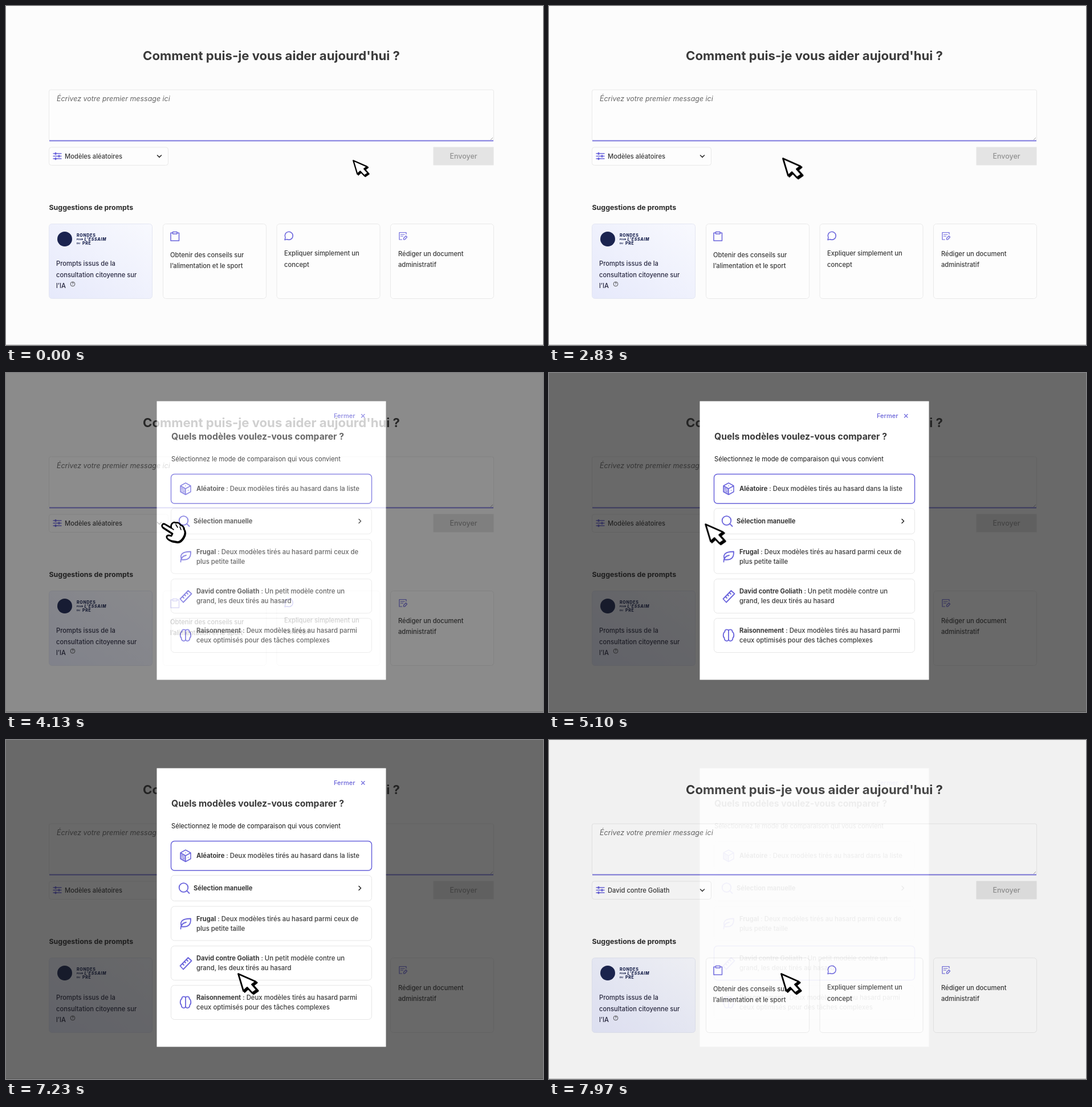
Write an HTML page that moves like this. It is 942x595 px and loops after 8 s.

```html
<!DOCTYPE html>
<html lang="fr">
<head>
<meta charset="utf-8">
<title>Choix du modèle</title>
<style>
  html, body { margin: 0; width: 100%; height: 100%; overflow: hidden; background: #fcfcfc; }
  svg { display: block; width: 942px; height: 595px; }
  text { font: 500 11.2px Inter, "Open Sans", sans-serif; fill: #3a3a3a; }
  .h1 { font-size: 22.15px; font-weight: 700; text-anchor: middle; }
  .h2 { font-size: 12.4px; font-weight: 650; fill: #2c2c2c; }
  .h3 { font-size: 15.7px; font-weight: 700; }
  .hint { font-size: 12.45px; font-weight: 400; font-style: italic; fill: #666; }
  .send { font-size: 12.5px; fill: #929292; text-anchor: middle; }
  .opt { font-size: 11.35px; font-weight: 450; }
  .opt tspan { font-size: 11.15px; font-weight: 700; }
  .sub { font-size: 11.15px; font-weight: 400; fill: #161616; }
  .close { font-size: 11px; fill: #6a64d8; }
  .navy { fill: #2a2a42; }
  .brand text { font-size: 7px; font-weight: 800; letter-spacing: .7px; fill: #1b2450; }
  .brand .small { font-size: 4px; letter-spacing: 0; }
  .slant { font-style: italic; }
  .box { fill: #fdfdfd; stroke: #e9e9e9; }
  .row { fill: #fff; stroke: #e6e6e6; }
  .icon { fill: none; stroke: #6a64dc; stroke-width: 1.5; stroke-linejoin: round; stroke-linecap: round; }
  .thin { stroke-width: 1.2; }
  .big { stroke-width: 1.8; }
  .knob { stroke-width: 3; }
  .dark { stroke: #222; }
  .ink, .shade { stroke: #000; stroke-width: 2.8; stroke-linejoin: round; stroke-linecap: round; }
  .ink { fill: #fff; }
  .crease { fill: none; stroke-width: 1.6; }

  .anim { animation: 8s infinite; }
  .move-x { animation-name: move-x; animation-timing-function: cubic-bezier(.42, 0, .58, 1); }
  .move-y { animation-name: move-y; animation-timing-function: cubic-bezier(.45, 0, .62, 1); }
  .press { animation-name: press; animation-timing-function: ease-out; transform-origin: 0 0; }
  .modal { animation-name: modal; animation-timing-function: ease; }
  .arrow, .hand, .before, .after { animation-timing-function: step-end; }
  .arrow { animation-name: arrow; }
  .hand { animation-name: hand; }
  .before { animation-name: before; }
  .after { animation-name: after; }

  @keyframes move-x {
    0%, 25% { transform: translateX(608px); }
    43.75%, 62.5% { transform: translateX(272px); }
    81.25%, 100% { transform: translateX(406px); }
  }
  @keyframes move-y {
    0%, 25% { transform: translateY(270px); }
    43.75%, 62.5% { transform: translateY(263px); }
    81.25%, 100% { transform: translateY(409px); }
  }
  @keyframes press {
    0% { transform: scale(.79); }
    3.1%, 47.5% { transform: scale(1); }
    49% { transform: scale(.8); }
    51.25%, 94.6% { transform: scale(1); }
    96.1% { transform: scale(.8); }
    98.4%, 100% { transform: scale(1); }
  }
  @keyframes modal {
    0%, 49.9% { opacity: 0; }
    53.65%, 97.1% { opacity: 1; }
    100% { opacity: .07; }
  }
  @keyframes arrow { 0% { opacity: 1; } 41.6% { opacity: 0; } 62.5%, 100% { opacity: 1; } }
  @keyframes hand { 0% { opacity: 0; } 41.6% { opacity: 1; } 62.5%, 100% { opacity: 0; } }
  @keyframes before { 0% { opacity: 1; } 97%, 100% { opacity: 0; } }
  @keyframes after { 0% { opacity: 0; } 97%, 100% { opacity: 1; } }
</style>
</head>
<body>
<svg viewBox="0 0 942 595">
  <defs>
    <linearGradient id="tint" x1="0" y1="1" x2="1" y2="0">
      <stop offset="0" stop-color="#e6e9fb"/>
      <stop offset="1" stop-color="#f8f9fe"/>
    </linearGradient>
    <path id="arrow" d="M1.5 1.5L10.5 31.5L17 25.5L26 35L34 29.5L25.5 20L32 15Z"/>
    <path id="hand" d="M3 8C0 5 3 0 7 2.5L18 9C16 3 21-3 26 0C30-1 33 1.5 34 4C38 4.5 40 8 40 11C43 15 42 21 39 26C36 31 32 34 28 33.5L19 32C14 30 9 27 10 24C11 21 15 22 18 23L20 19Z"/>
  </defs>

  <rect width="942" height="595" fill="#fcfcfc"/>
  <path d="M0 594.5H942" stroke="#c8c8c8"/>
  <text class="h1" x="465.5" y="95">Comment puis-je vous aider aujourd'hui ?</text>

  <rect class="box" x="75.5" y="147" width="780" height="89.5" rx="3"/>
  <path d="M76 236.5H855" stroke="#7d78de" stroke-width="1.8"/>
  <path d="M850 235L854 231" stroke="#888" stroke-width=".8"/>
  <text class="hint" x="89" y="167">Écrivez votre premier message ici</text>

  <rect class="box" x="75.5" y="248" width="209" height="31.5" rx="4"/>
  <path class="icon" d="M83 259H97M83 263.5H97M83 268H97"/>
  <path class="icon knob" d="M87 258.2V259.8M93 262.7V264.3M87 267.2V268.8"/>
  <text class="anim before" x="103" y="267.5">Modèles aléatoires</text>
  <text class="anim after" x="103" y="267.5" opacity="0">David contre Goliath</text>
  <path class="icon dark" d="M265.5 262L269 265.5L272.5 262"/>

  <rect x="749.5" y="247.5" width="106" height="32" fill="#e4e4e4"/>
  <text class="send" x="802.5" y="268">Envoyer</text>

  <text class="h2" x="75.5" y="358">Suggestions de prompts</text>
  <rect x="75.5" y="382.5" width="181" height="131" rx="5" fill="url(#tint)" stroke="#e3e6f2"/>
  <rect class="box" x="275.5" y="382.5" width="181" height="131" rx="5"/>
  <rect class="box" x="475" y="382.5" width="181" height="131" rx="5"/>
  <rect class="box" x="674.5" y="382.5" width="181" height="131" rx="5"/>

  <g class="brand">
    <circle cx="103" cy="409" r="13" fill="#1b2450"/>
    <text x="124" y="404.5">RONDES</text>
    <text class="small" x="124" y="411">POUR</text>
    <text class="slant" x="137.5" y="411.5">L'ESSAIM</text>
    <text class="small" x="124" y="418">DU</text>
    <text x="134" y="418.5">PRÉ</text>
  </g>
  <text class="navy" x="88" y="456">Prompts issus de la</text>
  <text class="navy" x="88" y="475.5">consultation citoyenne sur</text>
  <text class="navy" x="88" y="494.5">l’IA</text>
  <circle cx="117" cy="488" r="3.9" fill="none" stroke="#444" stroke-width=".9"/>
  <text x="117" y="490.3" text-anchor="middle" style="font-size:6px">?</text>

  <path class="icon" d="M292.5 398.2H289V412H303.5V398.2H300M292.5 396.5H300V400H292.5Z"/>
  <text x="288" y="440.5">Obtenir des conseils sur</text>
  <text x="288" y="459.5">l’alimentation et le sport</text>

  <path class="icon" d="M489 410.5L490 406.5A7 7 0 1 1 493 409.5Z"/>
  <text x="488" y="438">Expliquer simplement un</text>
  <text x="488" y="457.5">concept</text>

  <path class="icon thin" d="M702 400.5V397.5H690V410H694.5M692.5 401H699M692.5 404H696.5M697.5 410V407.5L701.5 403.5L703.5 405.5L699.5 410Z"/>
  <text x="688" y="438.5">Rédiger un document</text>
  <text x="688" y="457.5">administratif</text>

  <g class="anim modal" opacity="0">
    <rect width="942" height="595" fill="#161616" fill-opacity=".64"/>
    <rect x="264.5" y="49.5" width="402" height="489" fill="#fff"/>
    <text class="close" x="575" y="79">Fermer</text>
    <path class="icon thin" d="M623.5 72.5L629 78M629 72.5L623.5 78"/>
    <text class="h3" x="290" y="117">Quels modèles voulez-vous comparer ?</text>
    <text class="sub" x="290" y="155">Sélectionnez le mode de comparaison qui vous convient</text>

    <rect class="row" x="289.5" y="177.5" width="352" height="51.5" rx="6"/>
    <rect class="row" x="289.5" y="237.5" width="352" height="45" rx="6"/>
    <rect class="row" x="289.5" y="292" width="352" height="60" rx="6"/>
    <rect class="row" x="289.5" y="361.5" width="352" height="60" rx="6"/>
    <rect class="row" x="289.5" y="430.5" width="352" height="60" rx="6"/>
    <rect class="icon anim before" x="289.5" y="177.5" width="352" height="51.5" rx="6"/>
    <rect class="icon anim after" x="289.5" y="361.5" width="352" height="60" rx="6" opacity="0"/>

    <path class="icon" d="M315 193L324 198V208.5L315 213.5L306 208.5V198ZM306 198L315 203L324 198M315 203V213.5"/>
    <path d="M306 198L315 203V213.5L306 208.5Z" fill="#6a64dc" fill-opacity=".45"/>
    <path class="icon" d="M315 198H315.1M309 203V203.1M312 208V208.1M319.5 206V206.1"/>
    <text class="opt" x="334" y="207"><tspan>Aléatoire</tspan> : Deux modèles tirés au hasard dans la liste</text>

    <circle class="icon big" cx="311.5" cy="259" r="7.8"/>
    <path class="icon big" d="M317.2 264.7L321.5 269"/>
    <text class="opt" x="329" y="264"><tspan>Sélection manuelle</tspan></text>
    <path class="icon dark" d="M619 256.5L622.5 260L619 263.5"/>

    <path class="icon big" d="M306.5 331.5C306.5 324 310 321 316 320M308 327.5C304 318 310 313.5 324 313.5C324.5 324 320 329 308 327.5"/>
    <text class="opt" x="334" y="318"><tspan>Frugal</tspan> : Deux modèles tirés au hasard parmi ceux de</text>
    <text class="opt" x="334" y="334.5">plus petite taille</text>

    <path class="icon big" d="M305.5 396.5L319.5 382L325.5 387.5L311 402.5ZM309.5 392.5L312 395M313 389L315 391M316.5 385.5L319 388"/>
    <text class="opt" x="334" y="387"><tspan>David contre Goliath</tspan> : Un petit modèle contre un</text>
    <text class="opt" x="334" y="403.5">grand, les deux tirés au hasard</text>

    <path class="icon big" d="M315 453C315 449 308 449.5 308.5 454C305 456 305 463 307.5 465C308 472 315 471.5 315 467ZM315 453C315 449 322 449.5 321.5 454C325 456 325 463 322.5 465C322 472 315 471.5 315 467"/>
    <text class="opt" x="334" y="456"><tspan>Raisonnement</tspan> : Deux modèles tirés au hasard parmi</text>
    <text class="opt" x="334" y="472.5">ceux optimisés pour des tâches complexes</text>
  </g>

  <g class="anim move-x"><g class="anim move-y"><g class="anim press">
    <g class="anim arrow">
      <use href="#arrow" class="shade" x="2.2" y="1.8"/>
      <use href="#arrow" class="ink"/>
    </g>
    <g class="anim hand" opacity="0">
      <use href="#hand" class="shade" x=".8" y="1"/>
      <use href="#hand" class="ink"/>
      <path class="ink crease" d="M18 9L22 12M26 3L29 8M33 7L35 12"/>
    </g>
  </g></g></g>
</svg>
</body>
</html>
```
